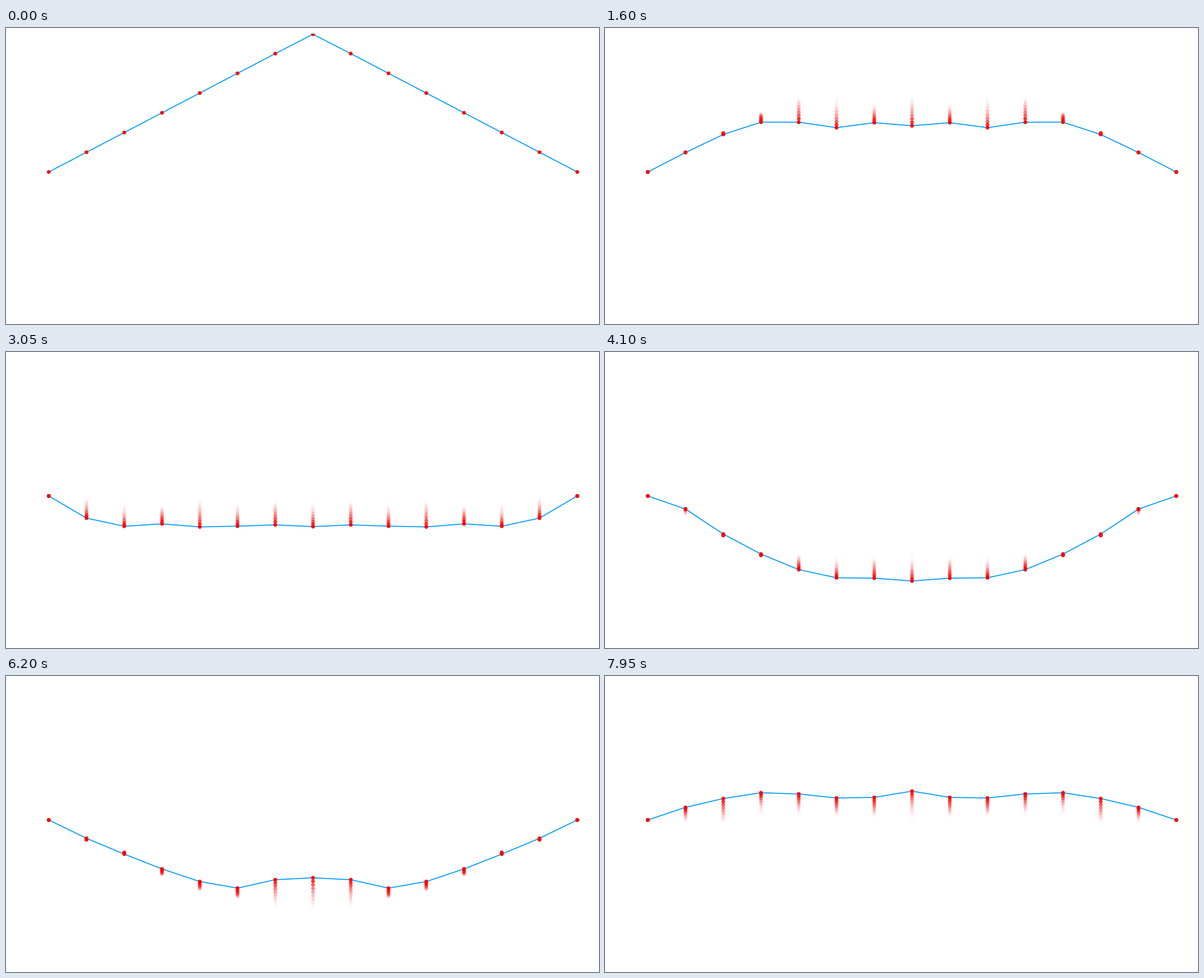
A matplotlib script that plays this animation: 1058x529 px, repeating every 8000 ms.

```python
import numpy as np
import matplotlib.pyplot as plt
from matplotlib.animation import FuncAnimation

WIDTH, HEIGHT, DPI = 1058, 529, 100
FRAMES, INTERVAL = 160, 50
PX = 72 / DPI                      # one pixel in points

# String of beads, plucked in the middle and fixed at both ends
SEGMENTS = 14
COUPLING = np.sqrt(0.02)           # per frame
DAMPING = 0.001                    # per frame
REST_Y, PLUCK, TOP = 257.3, 246.8, 10.4
TAIL = 10

bead = np.arange(SEGMENTS + 1)
bead_x = 547.75 + 67.35 * (bead - SEGMENTS / 2)

# Odd normal modes of the triangular start shape
mode = np.arange(1, SEGMENTS, 2)
half_sine = np.sin(mode * np.pi / (2 * SEGMENTS))
start = (PLUCK / (SEGMENTS / 2) / SEGMENTS
         * np.sin(mode * np.pi / 2) / half_sine ** 2)
omega = np.sqrt((2 * COUPLING * half_sine) ** 2 - DAMPING ** 2)
shapes = np.sin(np.outer(bead, mode) * np.pi / SEGMENTS)


def bead_y(t):
    swing = np.cos(omega * t) + DAMPING / omega * np.sin(omega * t)
    return REST_Y - shapes @ (start * swing) * np.exp(-DAMPING * t)


fig = plt.figure(figsize=(WIDTH / DPI, HEIGHT / DPI), dpi=DPI, facecolor="white")
ax = fig.add_axes([0, 0, 1, 1 - TOP / HEIGHT])
ax.set_xlim(0, WIDTH)
ax.set_ylim(HEIGHT, TOP)
ax.axis("off")

string, = ax.plot([], [], color="#009afa", lw=1.75 * PX, zorder=1)
dots = ax.scatter([], [], s=(6.7 * PX) ** 2, linewidths=0, zorder=2)


def draw(frame):
    now = frame + 1
    times = np.arange(max(1, now - TAIL + 1), now + 1)
    heights = [bead_y(t) for t in times]
    string.set_data(bead_x, heights[-1])

    colors = np.zeros((len(times), 4))
    colors[:, 0] = 1
    colors[:, 3] = (1 - (now - times) / TAIL) ** 2
    dots.set_offsets(np.column_stack([np.tile(bead_x, len(times)),
                                      np.concatenate(heights)]))
    dots.set_facecolors(np.repeat(colors, len(bead), axis=0))
    return string, dots


anim = FuncAnimation(fig, draw, frames=FRAMES, interval=INTERVAL,
                     repeat=True, repeat_delay=0)
plt.show()
```
